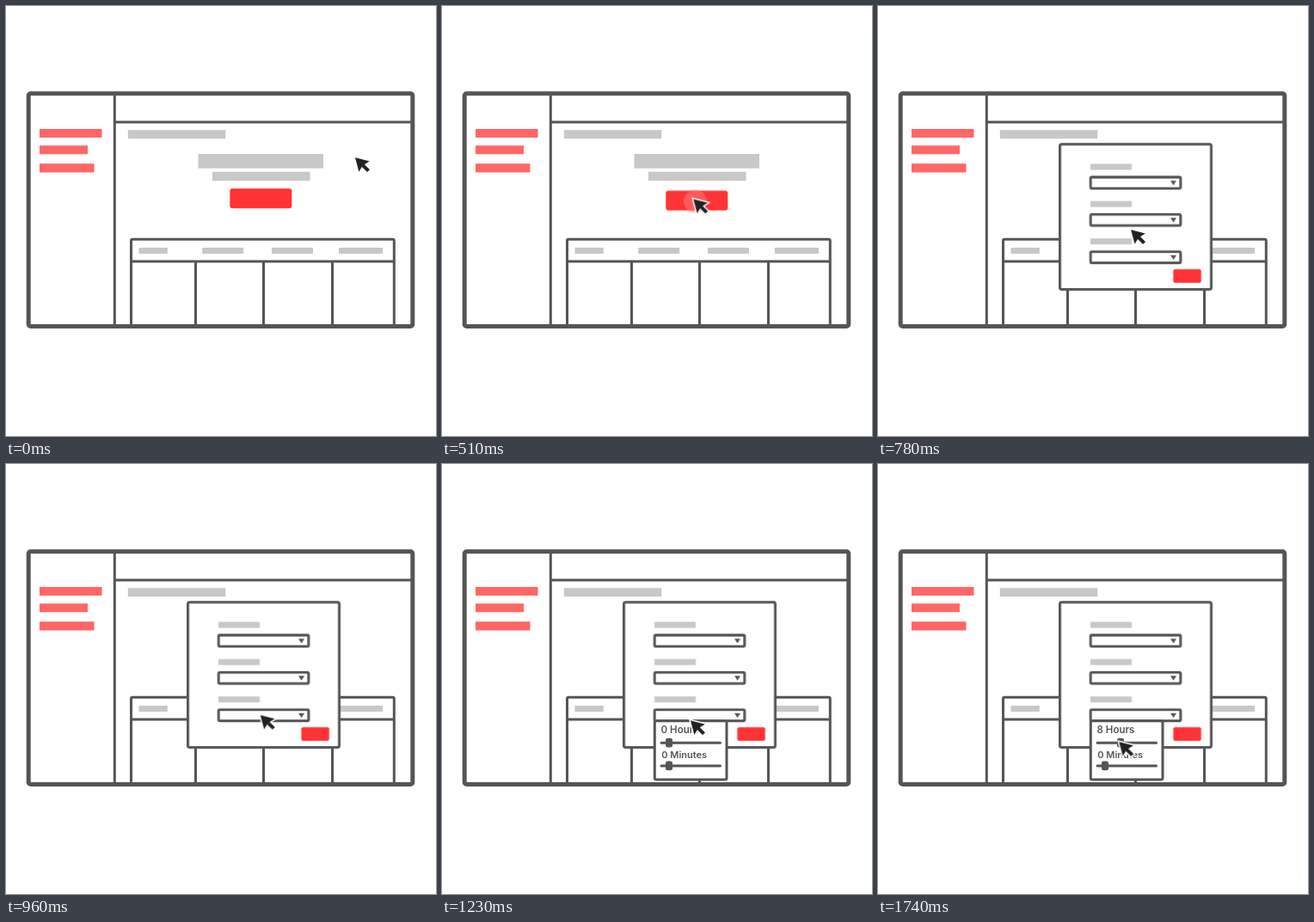
An HTML page that plays this animation: 500x500 px, repeating every 2.25 s.

```html
<!DOCTYPE html>
<html lang="en">
<head>
<meta charset="utf-8">
<title>Time picker walkthrough</title>
<style>
html, body { margin: 0; width: 100%; height: 100%; overflow: hidden; background: #fff; }
svg { display: block; width: 100vw; height: 100vh; }
.line { fill: none; stroke: #555; stroke-width: 3; }
.box { fill: #fff; stroke: #555; stroke-width: 3; }
.dark { fill: #555; }
.grey { fill: #c8c8c8; }
.pink { fill: #ff6666; }
.red { fill: #ff3333; }
.ripple { fill: #ff8080; }
text { font: 600 11.5px Inter, "Open Sans", sans-serif; fill: #555; }
.small { font-size: 11px; }

/* One loop is 2250 ms, so 1% is 22.5 ms */
.anim { animation: 2250ms linear infinite; }
#cursor { animation-name: point; }
#button { animation-name: press; }
#tap1 { animation-name: tap1; }
#tap2 { animation-name: tap2; }
#modal { animation-name: open; transform-origin: 250px 250px; }
#popup { animation-name: drop; }
#knob { animation-name: drag; }
#before { animation-name: before; }
#after { animation-name: after; }

@keyframes point {
  0% { transform: translate(406px, 176px); animation-timing-function: ease-in-out; }
  10.667%, 26.2% { transform: translate(292.3px, 224.3px); animation-timing-function: ease-in-out; }
  42.667%, 51.1% { transform: translate(295.7px, 291.7px); animation-timing-function: ease-in-out; }
  62.667% { transform: translate(262.7px, 322.8px); animation-timing-function: cubic-bezier(.333, .667, .667, 1); }
  77.333%, 100% { transform: translate(280.3px, 322.8px); }
}
@keyframes press {
  0%, 16.5% { transform: none; }
  20%, 26.59% { transform: translateY(2.5px); }
  26.6%, 100% { transform: none; }
}
@keyframes tap1 {
  0%, 18.667% { transform: scale(0); opacity: .55; animation-timing-function: ease-out; }
  25.333% { transform: scale(1); opacity: .5; }
  26.59% { transform: scale(1); opacity: .25; }
  26.6%, 100% { transform: scale(1); opacity: 0; }
}
@keyframes tap2 {
  0%, 42.667% { transform: scale(0); opacity: .55; animation-timing-function: ease-out; }
  49.333% { transform: scale(1); opacity: .5; }
  51.1%, 100% { transform: scale(1); opacity: 0; }
}
@keyframes open {
  0%, 26.59% { opacity: 0; transform: scale(1.1); }
  26.6% { opacity: .5; transform: scale(1.1); animation-timing-function: cubic-bezier(.333, .667, .667, 1); }
  33%, 100% { opacity: 1; transform: none; }
}
@keyframes drop {
  0%, 48% { opacity: 0; }
  53.333%, 100% { opacity: 1; }
}
@keyframes drag {
  0%, 62.667% { transform: none; animation-timing-function: cubic-bezier(.333, .667, .667, 1); }
  77.333%, 100% { transform: translateX(18px); }
}
@keyframes before {
  0%, 69.3% { opacity: 1; }
  69.31%, 100% { opacity: 0; }
}
@keyframes after {
  0%, 69.3% { opacity: 0; }
  69.31%, 100% { opacity: 1; }
}
</style>
</head>
<body>
<svg viewBox="0 0 500 500">
  <defs>
    <g id="field">
      <rect class="grey" x="247" y="183.5" width="48" height="7"/>
      <rect class="box" x="247.2" y="199" width="104.6" height="13" rx="1.5"/>
      <path class="dark" d="M340 203h7l-3.5 5.5z"/>
    </g>
  </defs>

  <path class="line" d="M126.3 102V372M126.3 135H472"/>
  <path class="line" d="M145.5 372V273q0-1.8 1.8-1.8H449.5q1.8 0 1.8 1.8V372M145.5 297H451.3M220.5 297V372M299.5 297V372M379.5 297V372"/>
  <rect class="line" x="26.2" y="101.7" width="446.6" height="270.8" rx="2.5" style="stroke-width:5"/>

  <path class="pink" d="M39 143h72.5v10H39zM39 162.2h56v10H39zM39 183.3h63.5v10.2H39z"/>
  <path class="grey" d="M141.8 144.3h113.5v10H141.8zM223.5 172H369v16.7H223.5zM240 192.8h113.5v10.4H240z"/>
  <path class="grey" d="M154.5 281h33.3v7h-33.3zM228.2 281h48v7h-48zM309 281h48v7h-48zM387 281h51v7h-51z"/>

  <rect id="button" class="red anim" x="260.3" y="212.2" width="72" height="23" rx="3"/>
  <g transform="translate(294.5 227)"><circle id="tap1" class="ripple anim" r="17"/></g>

  <g id="modal" class="anim">
    <rect class="box" x="211.5" y="160.7" width="176" height="168.8" rx="2"/>
    <use href="#field"/>
    <use href="#field" y="43.3"/>
    <use href="#field" y="86.7"/>
    <rect class="red" x="343.3" y="306" width="32.5" height="15.7" rx="2.3"/>
  </g>
  <g transform="translate(297 293)"><circle id="tap2" class="ripple anim" r="17"/></g>

  <g id="popup" class="anim">
    <rect class="box" x="247.3" y="298.7" width="83.7" height="68.3" rx="2"/>
    <text id="before" class="anim" x="254.6" y="313.2">0 Hours</text>
    <text id="after" class="anim" x="254.6" y="313.2">8 Hours</text>
    <text class="small" x="255.3" y="342.2">0 Minutes</text>
    <path class="line" stroke-linecap="round" d="M255 324.2H323.5M255 351H323.5"/>
    <rect id="knob" class="dark anim" x="260" y="318.8" width="8" height="10.8" rx="2.5"/>
    <rect class="dark" x="260" y="345.5" width="8" height="10.8" rx="2.5"/>
  </g>

  <g id="cursor" class="anim">
    <path d="M0 .3 16.7 4.6 10.8 8.3 17 14.2 14 17.1 7.9 11 4.4 16.8z" fill="#222" stroke="#fff" stroke-width="3" paint-order="stroke"/>
  </g>
</svg>
</body>
</html>
```
